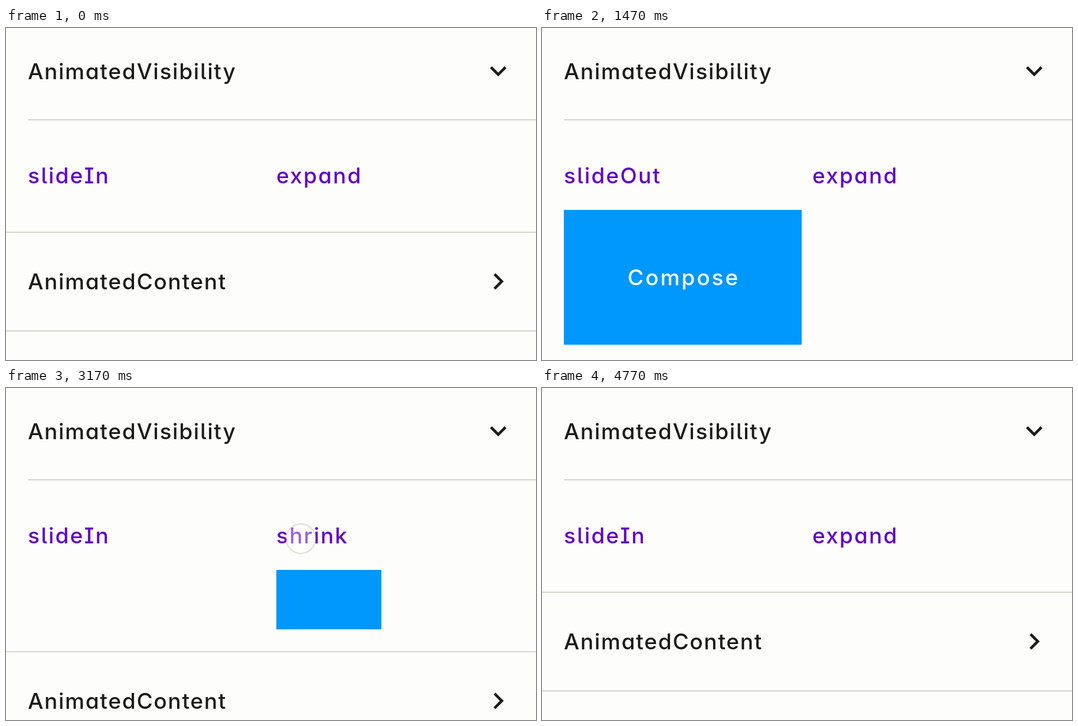
Write an HTML page that moves like this. It is 898 by 564 pixels and loops after 4810 ms.

```html
<!DOCTYPE html>
<html lang="en">
<head>
<meta charset="utf-8">
<title>Visibility transitions</title>
<style>
  html, body { margin: 0; width: 100%; height: 100%; overflow: hidden; background: #fdfdfb; }
  svg { display: block; }
  text {
    font: 500 37px Inter, "Open Sans", sans-serif;
    font-feature-settings: "cv05", "cv08", "cv11";
    letter-spacing: 1.75px;
    fill: #1b1b1a;
  }
  .label { fill: #6002c8; letter-spacing: 2.2px; }
  .card text { fill: #fdfdfb; letter-spacing: 3px; }
  .card rect { fill: #0098fc; }
  .icon { fill: #1b1b1a; }
  .line { fill: #d6d5ca; }
</style>
</head>
<body>
<svg width="898" height="564" viewBox="0 0 898 564">
  <defs>
    <g id="card" class="card">
      <rect width="403" height="229"/>
      <text x="108" y="128">Compose</text>
    </g>
    <radialGradient id="spot">
      <stop offset="0" stop-color="#fff" stop-opacity=".65"/>
      <stop offset=".84" stop-color="#fff" stop-opacity=".65"/>
      <stop offset=".93" stop-color="#b8b8ac" stop-opacity=".85"/>
      <stop offset="1" stop-color="#b8b8ac" stop-opacity="0"/>
    </radialGradient>
  </defs>

  <text x="37" y="87">AnimatedVisibility</text>
  <path class="icon" transform="translate(806 45) scale(2.333)"
        d="M16.59 8.59 12 13.17 7.41 8.59 6 10l6 6 6-6z"/>
  <rect class="line" x="37" y="155" width="861" height="2"/>

  <g id="below">
    <rect class="line" y="346" width="898" height="2"/>
    <text x="37" y="444">AnimatedContent</text>
    <path class="icon" transform="translate(806 402.5) scale(2.333)"
          d="M10 6 8.59 7.41 13.17 12l-4.58 4.59L10 18l6-6z"/>
    <rect class="line" y="513.5" width="898" height="2"/>
  </g>

  <text id="slideLabel" class="label" x="37" y="264">slideIn</text>
  <text id="growLabel" class="label" x="458" y="264">expand</text>

  <use id="slideCard" href="#card"/>
  <svg id="growClip" x="458" y="309" overflow="hidden"><use id="growCard" href="#card"/></svg>

  <circle id="touch" r="27" fill="url(#spot)"/>
</svg>

<script>
  const LOOP = 4810, SETTLE = 415, PRESS = 100, FADE = 180;
  const W = 403, H = 229;
  const slide = { on: 785, off: 1880 };
  const grow = { on: 3096, off: 4290 };
  // release time and position of each tap
  const taps = [
    [slide.on, 110, 252], [slide.off, 110, 254],
    [grow.on, 499.5, 256], [grow.off, 504.5, 263]
  ];
  const $ = id => document.getElementById(id);
  const [below, slideLabel, growLabel, slideCard, growClip, growCard, touch] =
    ["below", "slideLabel", "growLabel", "slideCard", "growClip", "growCard", "touch"].map($);

  // Critically damped spring, stiffness 400: share of the way still to go.
  function remaining(ms) {
    if (ms >= SETTLE) return 0;
    const u = ms * 0.02;
    return (1 + u) * Math.exp(-u);
  }

  // How far a card has entered, 0 to 1, and whether it takes part in layout.
  function phase(t, { on, off }) {
    if (t < on || t >= off + SETTLE) return { shown: false, open: false, amount: 0 };
    const open = t < off;
    return { shown: true, open, amount: open ? 1 - remaining(t - on) : remaining(t - off) };
  }

  const show = (el, yes) => el.setAttribute("visibility", yes ? "visible" : "hidden");
  const move = (el, x, y) => el.setAttribute("transform", `translate(${x} ${y})`);

  function drawTouch(t) {
    const tap = taps.find(([up]) => t >= up - PRESS && t < up + FADE);
    show(touch, tap);
    if (!tap) return;
    const [up, x, y] = tap;
    move(touch, x, y);
    touch.setAttribute("opacity", Math.min(1, 1 - (t - up) / FADE));
  }

  function draw(t) {
    const s = phase(t, slide), g = phase(t, grow);
    const w = Math.floor(W * g.amount), h = Math.floor(H * g.amount);

    slideLabel.textContent = s.open ? "slideOut" : "slideIn";
    growLabel.textContent = g.open ? "shrink" : "expand";

    show(slideCard, s.shown);
    move(slideCard, Math.round(37 - W * (1 - s.amount)), Math.round(309 - H * (1 - s.amount)));

    show(growClip, g.shown);
    growClip.setAttribute("width", w);
    growClip.setAttribute("height", h);
    move(growCard, w - W, h - H);

    move(below, 0, s.shown ? H : h);
    drawTouch(t);
  }

  const start = performance.now();
  function tick() {
    draw((performance.now() - start) % LOOP);
    requestAnimationFrame(tick);
  }
  tick();
</script>
</body>
</html>
```
